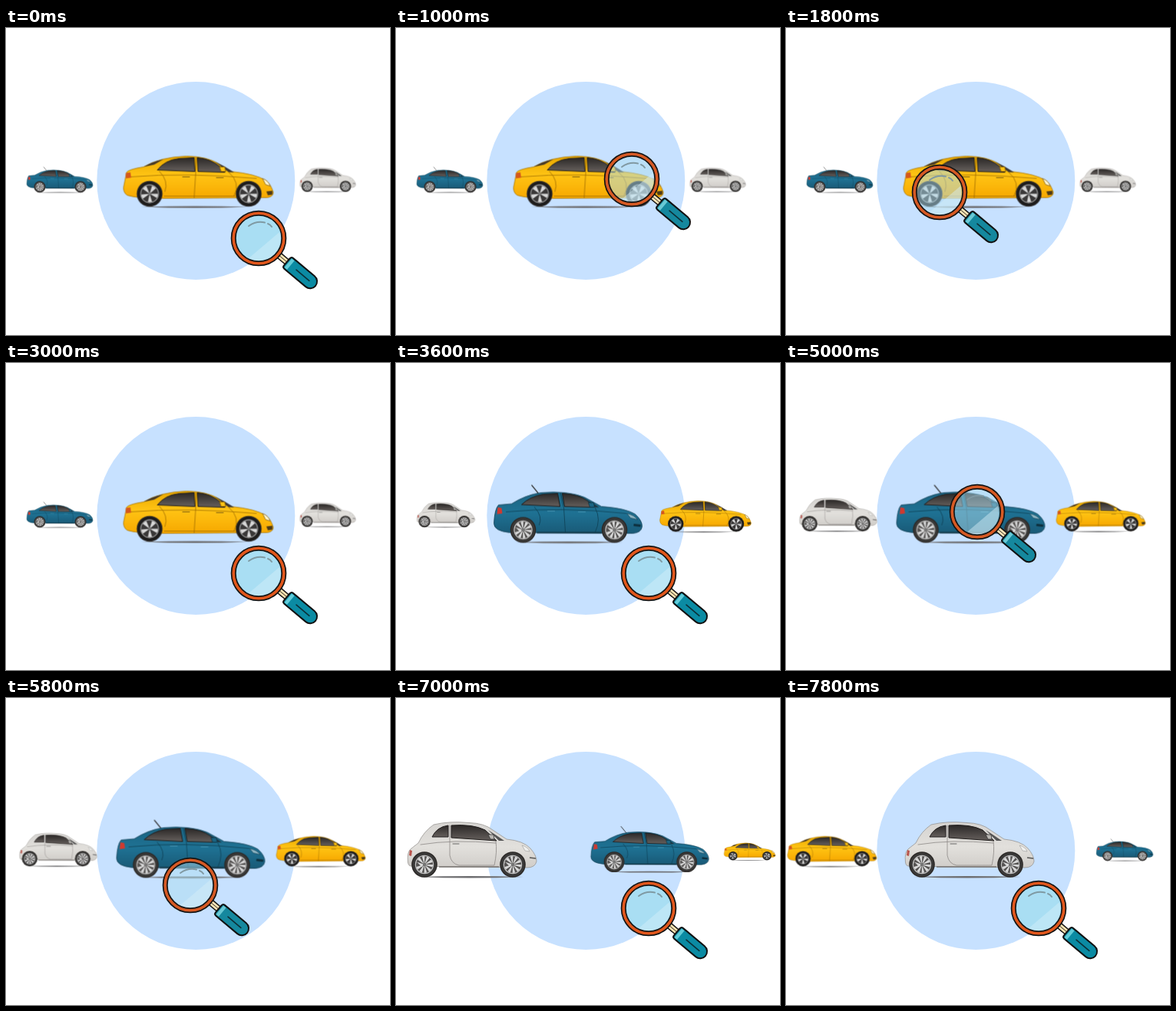
Recreate the animation shown at these times as an HTML page without scripts. Size 500x400 px, loop 8000 ms.

```html
<!DOCTYPE html>
<html lang="en">
<head>
<meta charset="utf-8">
<title>Car search</title>
<style>
  html, body { margin: 0; width: 100%; height: 100%; overflow: hidden; background: #fff; }
  svg { display: block; width: 500px; height: 400px; }

  .yellow, .blue, .white, .loupe, .soft, .glass { animation: 8s step-end infinite; }
  .yellow { animation-name: yellow; }
  .blue { animation-name: blue; }
  .white { animation-name: white; }
  .loupe { animation-name: orbit; }
  .soft { animation-name: soften; }
  .glass { animation-name: clear; }

  .trim { fill: none; stroke-width: .8; stroke-linecap: round; }
  .window { fill: url(#tint); stroke: #201d1c; stroke-width: 1; }

  /* Cars: centre <-> side slots, one car wraps from right to left */
  @keyframes yellow {
    0%, 100% { transform: translate(250.5px, 199.5px); }
    40% { transform: translate(340px, 199.5px) scale(.8); }
    42.5% { transform: translate(384px, 199.5px) scale(.67); }
    45% { transform: translate(403px, 199.5px) scale(.61); }
    47.5% { transform: translate(409px, 199.5px) scale(.597); }
    50% { transform: translate(410px, 199.5px) scale(.595); }
    87.5% { transform: translate(460.5px, 200px) scale(.343); }
    90% { transform: translate(33px, 199.5px) scale(.3); }
    92.5% { transform: translate(49px, 199.5px) scale(.47); }
    95% { transform: translate(57px, 199.5px) scale(.56); }
    97.5% { transform: translate(60px, 199.5px) scale(.595); }
  }
  @keyframes blue {
    0%, 100% { transform: translate(70px, 198.5px) scale(.446); }
    40% { transform: translate(125px, 198.5px); }
    42.5% { transform: translate(187px, 198.5px); }
    45% { transform: translate(224px, 198.5px); }
    47.5% { transform: translate(237px, 198.5px); }
    50% { transform: translate(240.5px, 198.5px); }
    87.5% { transform: translate(330.5px, 198.5px) scale(.795); }
    90% { transform: translate(395px, 198.5px) scale(.55); }
    92.5% { transform: translate(426px, 198.5px) scale(.44); }
    95% { transform: translate(438px, 198.5px) scale(.395); }
    97.5% { transform: translate(441px, 198.5px) scale(.383); }
  }
  @keyframes white {
    0%, 100% { transform: translate(419px, 198px) scale(.434); }
    40% { transform: translate(446px, 198px) scale(.25); }
    42.5% { transform: translate(50px, 198px) scale(.26); }
    45% { transform: translate(65px, 198px) scale(.45); }
    47.5% { transform: translate(67.5px, 198px) scale(.57); }
    50% { transform: translate(68px, 198px) scale(.6); }
    87.5% { transform: translate(99px, 198px); }
    90% { transform: translate(175px, 198px); }
    92.5% { transform: translate(219px, 198px); }
    95% { transform: translate(235px, 198px); }
    97.5% { transform: translate(239px, 198px); }
  }

  /* Loupe: two identical trips around the centre car */
  @keyframes orbit {
    0%, 35%, 82.5%, 100% { transform: translate(329px, 274px); }
    2.5%, 50% { transform: translate(316px, 255px); }
    5%, 52.5% { transform: translate(290px, 223px); }
    7.5%, 55% { transform: translate(303px, 208px); }
    10%, 57.5% { transform: translate(308px, 202px); }
    12.5%, 60% { transform: translate(307px, 197px); }
    15%, 62.5% { transform: translate(249px, 194px); }
    17.5%, 65% { transform: translate(226px, 184px); }
    20%, 67.5% { transform: translate(204px, 193px); }
    22.5%, 70% { transform: translate(200px, 214px); }
    25%, 72.5% { transform: translate(240px, 244px); }
    27.5%, 75% { transform: translate(247px, 243px); }
    30%, 77.5% { transform: translate(249px, 243px); }
    32.5%, 80% { transform: translate(305px, 263px); }
  }
  @keyframes soften {
    0%, 35%, 82.5%, 100% { filter: none; }
    2.5%, 50% { filter: blur(.6px) saturate(.9); }
  }
  @keyframes clear {
    0%, 35%, 82.5%, 100% { fill-opacity: 1; }
    2.5%, 50% { fill-opacity: .5; }
  }
</style>
</head>
<body>
<svg viewBox="0 0 500 400">
  <defs>
    <linearGradient id="gold" x2="0" y2="1">
      <stop offset="0" stop-color="#e9a800"/>
      <stop offset=".45" stop-color="#ffc414"/>
      <stop offset="1" stop-color="#f7a800"/>
    </linearGradient>
    <linearGradient id="teal" x2="0" y2="1">
      <stop offset="0" stop-color="#1b6482"/>
      <stop offset=".5" stop-color="#1f7294"/>
      <stop offset="1" stop-color="#195a77"/>
    </linearGradient>
    <linearGradient id="pearl" x2="0" y2="1">
      <stop offset="0" stop-color="#d6d4d1"/>
      <stop offset=".55" stop-color="#e2e0dc"/>
      <stop offset="1" stop-color="#d0cdc9"/>
    </linearGradient>
    <linearGradient id="tint" x2="0" y2="1">
      <stop offset="0" stop-color="#2b2827"/>
      <stop offset="1" stop-color="#66605d"/>
    </linearGradient>
    <g id="wheel">
      <circle r="16.8" fill="#2b2826"/>
      <circle r="15.4" fill="#3a3938"/>
      <circle r="11.5" fill="#555352"/>
      <circle r="6.5" fill="none" stroke="#d8d8d8" stroke-width="9" pathLength="10" stroke-dasharray=".55 .45"/>
      <circle r="11.6" fill="none" stroke="#c4c4c4" stroke-width="1.2"/>
      <circle r="2" fill="#777"/>
    </g>
    <g id="sport">
      <circle r="16.8" fill="#2b2826"/>
      <circle r="15.6" fill="#1d1c1c"/>
      <circle r="11.5" fill="#3a3838"/>
      <circle r="6.5" fill="none" stroke="#d8d8d8" stroke-width="9" pathLength="5" stroke-dasharray=".42 .58"/>
      <circle r="11.6" fill="none" stroke="#a8a8a8" stroke-width="1.1"/>
      <circle r="2" fill="#777"/>
    </g>
    <path id="shadow" d="M-70 0Q0 -2 70 0Q0 3 -70 0Z" fill="#6e6e70"/>
  </defs>

  <circle cx="247.3" cy="199" r="129" fill="#c7e1ff"/>

  <g class="white"><g transform="translate(-239 -198)">
    <use href="#shadow" x="236" y="233"/>
    <path d="M155.500 214Q154 200 160 196L169 189Q176 174 189 165Q210 160 235 162.500Q255 163 266 172L284 184Q306 186 315 196Q323 205 323 213Q321 221 311 221L160 219Q156 219 155.500 214Z" fill="url(#pearl)" stroke="#8f8b88" stroke-width=".7"/>
    <path class="window" d="M187 181Q193 168 208 166L208 181Z"/>
    <path class="window" d="M212 166Q240 164 256 172L271 186L212 182Z"/>
    <path d="M260 172Q271 179 281 186L274 186Z" fill="#555"/>
    <path class="trim" stroke="#8d8a87" d="M210 166L210 205Q212 216 222 218L268 218Q272 200 270 187M172 191Q215 184 270 189"/>
    <path class="trim" stroke="#444" d="M214 190H222"/>
    <path d="M196 220H274" stroke="#77736f" stroke-width="1.5"/>
    <path d="M260 178h7l1 6h-5z" fill="#b9b6b2" stroke="#333" stroke-width=".8"/>
    <path d="M158 198l3 1-1 7-3-1z" fill="#b8544c"/>
    <path d="M304 192q8 2 10 8l-6-1z" fill="#f0f0ee" stroke="#999" stroke-width=".6"/>
    <path d="M314 208l8 1" stroke="#555" stroke-width="1.5"/>
    <use href="#wheel" x="177" y="217"/>
    <use href="#wheel" x="292" y="217"/>
  </g></g>

  <g class="blue"><g transform="translate(-240.5 -198.5)">
    <use href="#shadow" x="242" y="233.500"/>
    <path d="M202 170L193 159" stroke="#333" stroke-width="1.2"/>
    <path d="M144 209Q145 190 150 185L167 183.500Q185 172 205 169Q240 166 262 175L284 187Q315 189 328 197Q337 205 337 213Q336 221 325 222L165 221Q144 219 144 209Z" fill="url(#teal)" stroke="#123e52" stroke-width=".8"/>
    <path class="window" d="M180 184.500Q191 174 208 171L227 170L230 187Z"/>
    <path class="window" d="M233 170Q254 171 267 180L274 188L236 187Z"/>
    <path d="M260 176Q271 181 281 188L276 188Z" fill="#20333d"/>
    <path class="trim" stroke="#0e3f54" d="M231 170L235 189L237 220M197 188Q208 200 203 211M276 189Q284 204 276 220M160 194Q230 187 316 196"/>
    <path class="trim" stroke="#4f9bb8" d="M214 193h9M254 194h9"/>
    <path d="M200 221H284" stroke="#12394a" stroke-width="2"/>
    <path d="M267 182h7l1 6h-6z" fill="#1b6482" stroke="#0d3140" stroke-width=".8"/>
    <path d="M149 188l5 1 1 7-7 1z" fill="#cf3a30"/>
    <path d="M317 196q10 2 14 8l-9-2z" fill="#8fb6c4" stroke="#123e52" stroke-width=".7"/>
    <path d="M326 211l9 1" stroke="#0d2f3d" stroke-width="3"/>
    <use href="#wheel" x="182" y="217.500"/>
    <use href="#wheel" x="301" y="217.500"/>
  </g></g>

  <g class="yellow"><g transform="translate(-250.5 -199.5)">
    <use href="#shadow" x="246" y="233"/>
    <path d="M153 208L157 188Q160 184 179 181Q201 168 235 167Q262 167 279 178L293 187Q325 190 339 199Q345 204 348 214Q348 220 340 221L204 222Q170 222 158 218Q153 215 153 208Z" fill="url(#gold)" stroke="#a87400" stroke-width=".8"/>
    <path d="M179 181Q191 174 205 171L193 178Z" fill="#45392a"/>
    <path class="window" d="M197 185Q207 172 226 170L245 169L246 187Z"/>
    <path class="window" d="M249 169Q266 170 279 181L285 188L250 187Z"/>
    <path d="M272 174Q285 180 297 188L290 188Z" fill="#3c3836"/>
    <path class="trim" stroke="#a06d00" d="M247 169L247 189L245 221M200 187Q212 199 207 213M290 188Q306 201 297 219M161 194Q235 188 326 196M206 219H298"/>
    <path class="trim" stroke="#5b4310" d="M230 194h9M274 195h9"/>
    <path d="M278 181h7l1 6h-6z" fill="#ffc414" stroke="#6b4a00" stroke-width=".8"/>
    <path d="M156 189l6-1 1 7-7 1z" fill="#d4571c"/>
    <path d="M334 196q8 3 10 10l-6-2z" fill="#fff5cf" stroke="#80601a" stroke-width=".8"/>
    <path d="M339 213l8-1v5l-6 1z" fill="#4a3a1a"/>
    <use href="#sport" x="187" y="216"/>
    <use href="#sport" x="316" y="216"/>
  </g></g>

  <g class="loupe"><g class="soft">
    <g transform="rotate(40)" stroke="#111" stroke-width="2" stroke-linejoin="round">
      <path d="M34 -3.8H50V3.8H34Z" fill="#fbe3b0" stroke-width="1.5"/>
      <path d="M35 0H49" stroke-width=".8"/>
      <path d="M51 -9H87.500A9 9 0 0 1 87.500 9H51Q48 9 48 6V-6Q48 -9 51 -9Z" fill="#0b8ba3"/>
      <path d="M50 -7.500H54.500V7.500H50Z" fill="#62cbd8" stroke="none"/>
      <path d="M64 0H86" stroke="#0b2f38" stroke-width="1.6" stroke-linecap="round"/>
    </g>
    <circle class="glass" r="31" fill="#a9def3"/>
    <path d="M-13 26L27 -8Q32 14 14 26Q0 33 -13 26Z" fill="#d6f0f8" opacity=".45"/>
    <circle r="32.8" fill="none" stroke="#151515" stroke-width="7"/>
    <circle r="32.8" fill="none" stroke="#e2571c" stroke-width="3.6"/>
    <path d="M-13 -16Q-3 -23 8 -20.500M12 -19Q15 -18 17 -15" fill="none" stroke="#7f9aa3" stroke-width="2" stroke-linecap="round"/>
  </g></g>
</svg>
</body>
</html>
```
